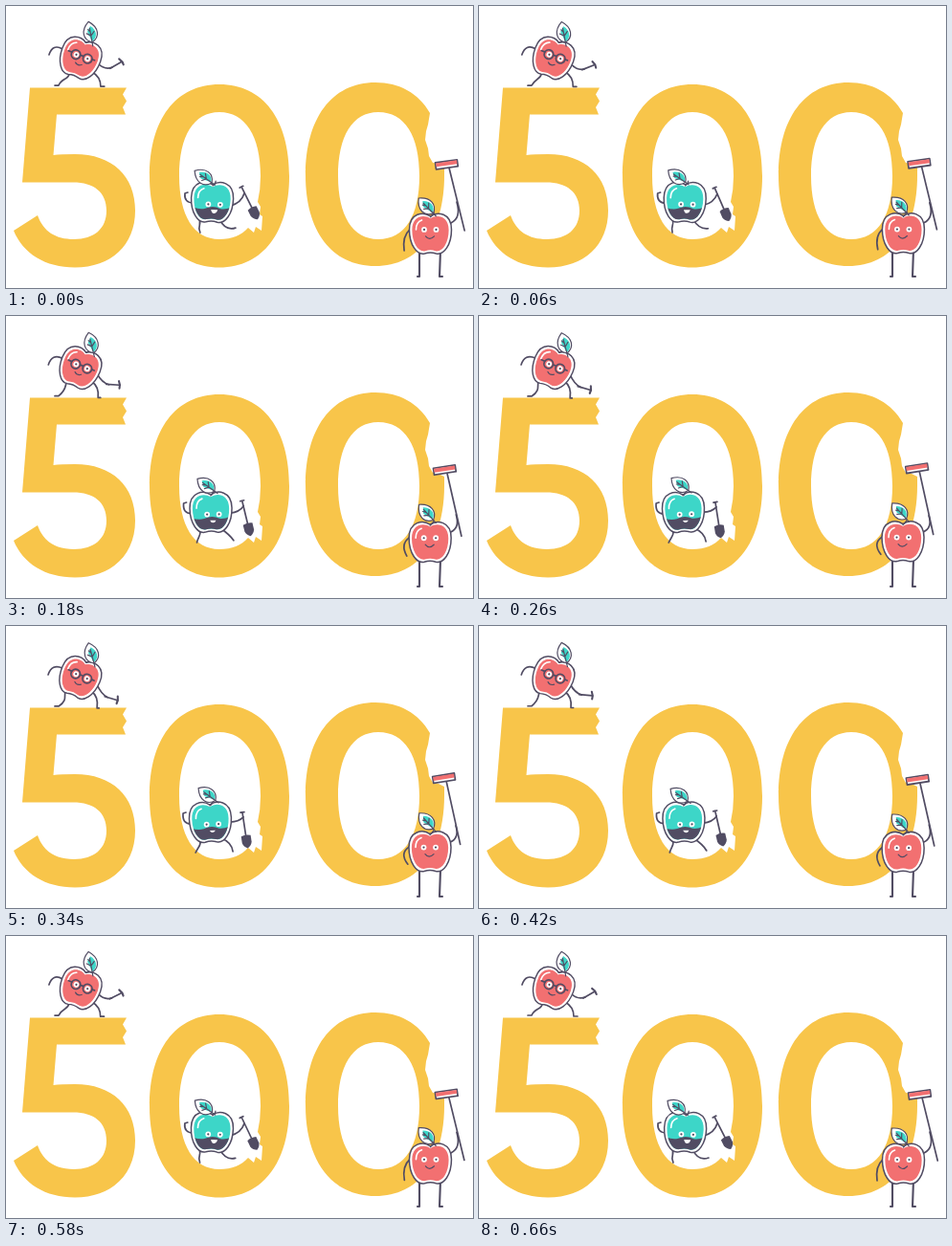
Animation, 488 px wide and 295 px high, one loop 0.68 s. Source, as an HTML page:

```html
<!DOCTYPE html>
<html lang="en">
<head>
<meta charset="utf-8">
<title>500</title>
<style>
  html, body { margin: 0; width: 100%; height: 100%; overflow: hidden; background: #fff; }
  svg { display: block; width: 488px; height: 295px; }
  .line { fill: none; stroke: #514c63; stroke-width: 1.7; stroke-linecap: round; stroke-linejoin: round; }
  .thin { stroke-width: 1.2; }
  .bold { stroke-width: 2.1; }
  .digit { fill: #f8c54a; fill-rule: evenodd; }
  .dark { fill: #514c63; }
  .red { fill: #f27071; }
  .teal { fill: #3dd6c8; }
  .white { fill: #fff; }
  .skin { fill: #fff; stroke-width: 1.5; }
</style>
</head>
<body>
<!-- data-d and data-transform hold the two extreme poses, separated by "|" -->
<svg viewBox="0 0 488 295">
  <defs>
    <path id="skin" d="M0-18C7-23 22-22 22-4C22 12 14 23 6 21Q0 19-6 21C-14 23-22 12-22-4C-22-22-7-23 0-18Z"/>
    <clipPath id="flesh"><use href="#skin" transform="scale(.87)"/></clipPath>
    <g id="leaf">
      <path class="line thin" style="fill:#fff" d="M0 0C-9-4-10-14 0-22C10-14 9-4 0 0Z"/>
      <path class="teal" d="M0-1C7-4 7-12 1-17L-3-12Z"/>
      <path class="line thin" d="M0 4V-15M0-7L-4-10M0-7L4-11M0-11L-2-14"/>
    </g>
    <g id="eyes">
      <circle class="white" cx="-6" cy="-4" r="2.9"/><circle class="white" cx="6.500" cy="-4" r="2.9"/>
      <circle class="dark" cx="-6" cy="-4" r="1.1"/><circle class="dark" cx="6.500" cy="-4" r="1.1"/>
    </g>
    <path id="shine" d="M-15-4Q-15-12-9-14" fill="none" stroke="#fff" stroke-width="1.6" stroke-linecap="round"/>
  </defs>

  <path class="digit" d="M25 85.500H126L122 92.500L126 99.500L122 106L125 113.500H53L49.500 156Q57 155 72 155C111 155 135 178 135 214C135 250 110 273.500 72 273.500C41 273.500 18 259 8 235L33 219C39 236 52 244 71 244C92 244 105 233 105 214C105 195 92 184.500 70 184.500H17Z"/>
  <path class="digit" d="M223 82C269 82 296 119 296 178C296 236 269 273.500 223 273.500C177 273.500 150 236 150 178C150 119 177 82 223 82ZM223 111C196 111 181 136 181 178C181 219 196 244 223 244C236 244 246 240 253 232L259 237L261 231L267 235L268 220L265 218L266 210L263 205Q266 192 266 178C266 136 250 111 223 111Z"/>
  <path class="digit" d="M386 80C411 80 431 91 443 112L441 124L439 131L438 140L441 149L442 157L446 164L452 165L458 168V177C458 235 432 272 386 272C340 272 313 235 313 177C313 118 340 80 386 80ZM389 111C362 111 347 136 347 178C347 219 362 244 389 244C417 244 432 219 432 178C432 136 417 111 389 111Z"/>

  <!-- apple with hammer -->
  <path class="line" data-d="M59 45Q49 39 45 51|M59 44Q48 39 44 51"/>
  <path class="line" data-d="M66 71C66 77 58 75 55 83H51|M62 69C60 72 65 78 55 84H51"/>
  <path class="line" data-d="M90 69Q99 74 99 84H103|M89 68Q97 74 95 86H97"/>
  <path class="line" data-d="M96 60Q103 67 111 64|M95 61Q99 71 106 75"/>
  <g data-transform="translate(109 65) rotate(-31)|translate(103 74) rotate(18)">
    <path class="line" d="M0 0H14"/><path class="line bold" d="M13-4Q15 0 14 3.500"/>
  </g>
  <g data-transform="translate(77.500 54.500) rotate(20)|translate(77 54) rotate(23)">
    <use href="#skin" class="line skin" transform="scale(.96)"/>
    <use href="#skin" class="red" transform="scale(.83)"/>
    <use href="#shine"/>
    <g transform="translate(1 2)"><use href="#eyes"/></g>
    <path class="line" d="M-10.500-3H-14M12.500-3H15M0-3H2"/>
    <circle class="line" cx="-5.500" cy="-2" r="4.800"/><circle class="line" cx="7.500" cy="-2" r="4.800"/>
    <path class="line thin" d="M-3 6Q0 9 4 6"/>
    <path class="line thin" d="M0-17Q3-20 5-21"/>
  </g>
  <use href="#leaf" data-transform="translate(90 38) rotate(-10)|translate(92 39) rotate(-15)"/>

  <!-- apple with shovel -->
  <path class="line" data-d="M196 206Q186 206 187 196L190 195|M193 207Q184 207 185 196L188 195"/>
  <path class="line" data-d="M201 221C206 229 199 229 203 237L199 235|M198 221C207 227 202 229 198 237H194"/>
  <path class="line" data-d="M223 223Q229 236 240 232L244 237|M225 222Q236 226 237 236H241"/>
  <path class="line" data-d="M235 209Q246 206 249 196|M234 205Q243 205 248 200"/>
  <g data-transform="translate(246 189) rotate(-27)|translate(247 195) rotate(-8)">
    <path class="line" d="M-2 0H2M0 0V26"/>
    <path class="dark" d="M-5 25Q0 23 5 25V32Q4 36 0 38Q-4 36-5 32Z"/>
  </g>
  <g data-transform="translate(215.500 205) rotate(2)|translate(213.500 205) rotate(-2)">
    <use href="#skin" class="line skin"/>
    <use href="#skin" class="teal" transform="scale(.87)"/>
    <path clip-path="url(#flesh)" class="dark" d="M-22 5Q-14 9-7 7Q1 3 9 7Q15 8 22 4V22H-22Z"/>
    <use href="#shine"/>
    <g transform="translate(2 6.500)"><use href="#eyes"/></g>
    <path class="white" data-d="M-1 8H6Q5 12 2 12Q0 12 -1 8Z|M-1 9H5Q4 11 2 11Q0 11 -1 9Z"/>
    <path class="line thin" d="M0-17Q3-19 3-22"/>
  </g>
  <use href="#leaf" data-transform="translate(215 185) rotate(-55)|translate(219 182.500) rotate(-54)"/>

  <!-- apple with squeegee -->
  <path class="line" data-d="M422 234Q414 241 416 256|M421 231Q411 238 420 249"/>
  <path class="line bold" d="M432 255L432 283H430M454 255L453 283H456"/>
  <path class="line" data-d="M465 227Q476 222 471 205|M464 226Q474 222 470 209"/>
  <g data-transform="translate(460.500 166) rotate(-8)|translate(457.500 159) rotate(-9)">
    <path class="line" data-d="M2 3L9 71|M2 3L6 71"/>
    <rect class="line white" style="fill:#fff" x="-11.500" y="-3.500" width="23" height="7"/>
    <rect class="red" x="-11" y="-3" width="22" height="4"/>
  </g>
  <g data-transform="translate(443.500 238)|translate(443 235.500)">
    <use href="#skin" class="line skin"/>
    <use href="#skin" class="red" transform="scale(.87)"/>
    <use href="#shine"/>
    <g transform="translate(-.5 0)"><use href="#eyes"/></g>
    <path class="line thin" d="M-5 3Q-1 8 4 3"/>
    <path class="line thin" d="M0-17Q3-20 4-22"/>
  </g>
  <use href="#leaf" data-transform="translate(446.500 217) rotate(-44)|translate(446.500 212) rotate(-42)"/>
</svg>
<script>
  const PERIOD = 680, LEAD = 35;
  const NUMBER = /-?\d+(\.\d+)?/g;
  const parts = [];

  for (const attr of ['d', 'transform'])
    for (const el of document.querySelectorAll(`[data-${attr}]`)) {
      const [start, end] = el.dataset[attr].split('|');
      parts.push({ el, attr, start, ends: end.match(NUMBER) });
    }

  function draw() {
    const phase = (performance.now() % PERIOD + LEAD) / PERIOD;
    const k = (1 - Math.cos(2 * Math.PI * phase)) / 2;
    for (const { el, attr, start, ends } of parts) {
      let i = 0;
      el.setAttribute(attr, start.replace(NUMBER, n => {
        const value = +n + (ends[i++] - n) * k;
        return ' ' + value.toFixed(2);
      }));
    }
    requestAnimationFrame(draw);
  }
  draw();
</script>
</body>
</html>
```
